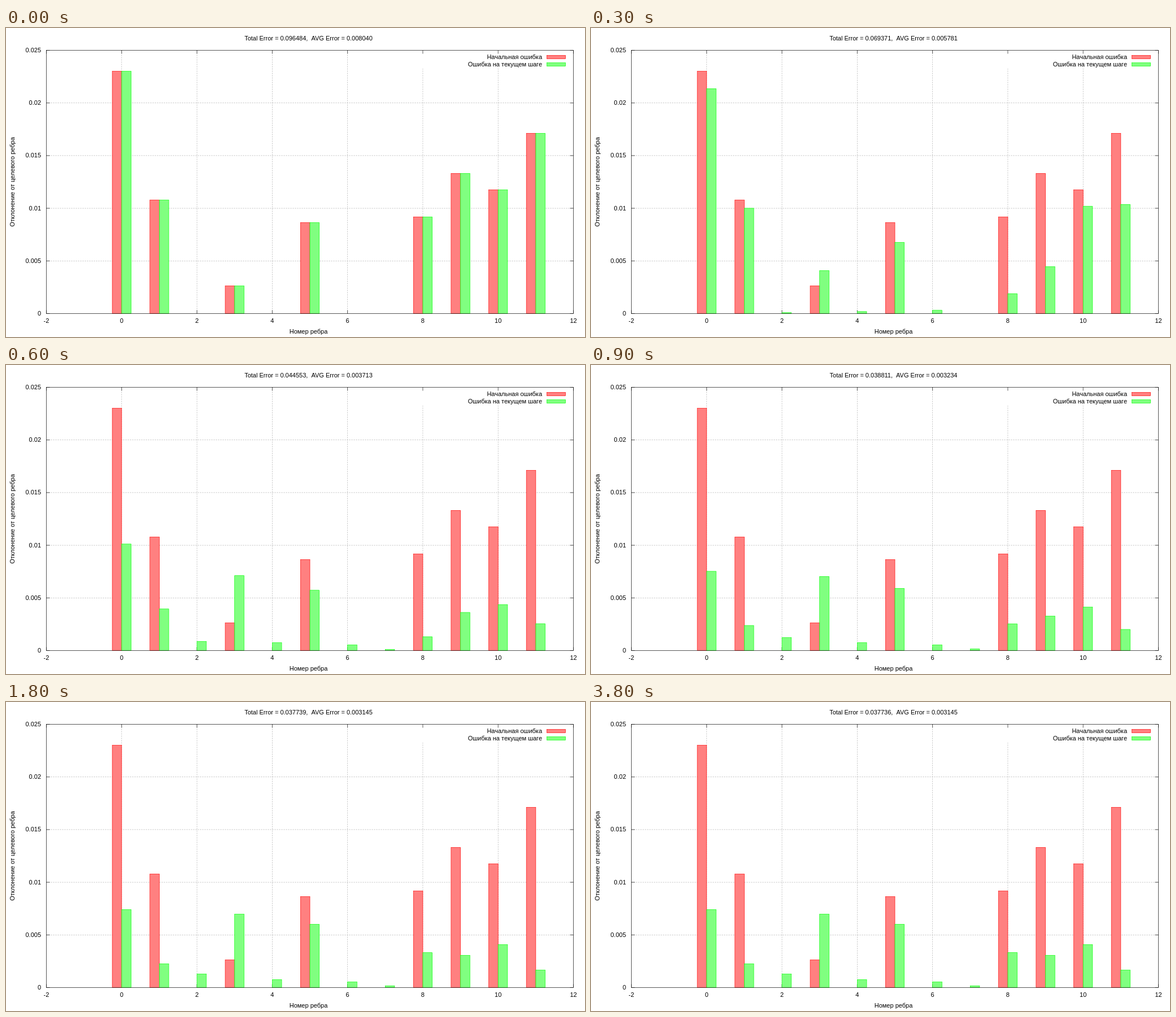
An HTML page with a canvas for the animation above (5 s loop, 1025 px wide and 547 px high).

```html
<!DOCTYPE html>
<html lang="ru">
<head>
<meta charset="utf-8">
<style>
  html, body { margin: 0; width: 100%; height: 100%; overflow: hidden; background: #fff; }
  canvas { display: block; }
</style>
</head>
<body>
<canvas id="chart" width="1025" height="547"></canvas>
<script>
const ctx = document.getElementById('chart').getContext('2d');
const LOOP = 5000;
const LEFT = 71.5, RIGHT = 1004.5, TOP = 39.5, BOTTOM = 505.5;
const RED = ['#ff8080', '#ff0000'], GREEN = ['#80ff80', '#00ff00'];

// Moments at which the optimiser shows its next step
const stepTimes = [0, 100, 300, 400, 500, 600, 800, 900, 1000, 1100, 1200,
                   1400, 1600, 1800, 3100, 3300, 3600, 3800];

// Each edge: first height, settled height, steps needed, swing on the way
const edges = [
  [429, 138, 4.15], [201, 42, 4.2, 3], [0, 24, 4.8], [49, 130, 2.8, 4],
  [0, 14, 3], [161, 112, 2, -7], [0, 10, 2.1], [0, 3, 5],
  [171, 62, 1.3, -50], [248, 57, 1.5, 14], [219, 76, 3.2, 3], [319, 31, 2.3, 22],
];

// Total error at a few steps
const totals = [[0, 0.096484], [2, 0.069371], [4, 0.047424], [7, 0.038811],
                [13, 0.037739], [14, 0.037706], [17, 0.037736]];

function currentHeight([first, settled, pace, swing = 0], step) {
  const bump = (step / 3.5 * Math.exp(1 - step / 3.5)) ** 4;
  return settled + (first - settled) * Math.exp(-((step / pace) ** 3)) + swing * bump;
}

function totalError(step) {
  const next = Math.max(1, totals.findIndex(([s]) => s >= step));
  const [s0, a] = totals[next - 1], [s1, b] = totals[next];
  return a + (b - a) * (step - s0) / (s1 - s0);
}

const xPixel = x => LEFT + (x + 2) / 14 * (RIGHT - LEFT);
const yPixel = y => BOTTOM - y / 0.025 * (BOTTOM - TOP);

function line(x1, y1, x2, y2, color = '#000', dash = []) {
  ctx.strokeStyle = color;
  ctx.setLineDash(dash);
  ctx.beginPath();
  ctx.moveTo(x1, y1);
  ctx.lineTo(x2, y2);
  ctx.stroke();
  ctx.setLineDash([]);
}

const gridLine = (...ends) => line(...ends, '#a0a0a0', [2, 2]);

function box(x, y, width, height, [fill, stroke]) {
  ctx.fillStyle = fill;
  ctx.strokeStyle = stroke;
  ctx.fillRect(x, y, width, height);
  ctx.strokeRect(x, y, width, height);
}

function text(str, x, y, align = 'center') {
  ctx.fillStyle = '#000';
  ctx.textAlign = align;
  ctx.fillText(str, x, y);
}

function bar(x, height, colors) {
  if (height < 0.2) return;
  box(xPixel(x), BOTTOM - height, xPixel(0.25) - xPixel(0), height, colors);
}

function drawAxes() {
  for (let x = -2; x <= 12; x += 2) {
    const px = xPixel(x);
    if (x > -2 && x < 12) gridLine(px, BOTTOM, px, x > 6 ? 72 : TOP);
    line(px, BOTTOM, px, BOTTOM - 6);
    line(px, TOP, px, TOP + 6);
    text(x, px, 522);
  }
  for (let i = 0; i <= 5; i++) {
    const py = yPixel(i * 0.005);
    if (i > 0 && i < 5) gridLine(LEFT, py, RIGHT, py);
    line(LEFT, py, LEFT + 6, py);
    line(RIGHT, py, RIGHT - 6, py);
    text(i * 5 / 1000, 62, Math.round(py + 3.5), 'right');
  }
  text('Номер ребра', 535.5, 541);
  ctx.save();
  ctx.translate(15, 272.5);
  ctx.rotate(-Math.PI / 2);
  text('Отклонение от целевого ребра', 0, 0);
  ctx.restore();
}

function drawLegend() {
  text('Начальная ошибка', 949, 55, 'right');
  box(957.5, 48.5, 33, 6, RED);
  text('Ошибка на текущем шаге', 949, 68, 'right');
  box(957.5, 61.5, 33, 6, GREEN);
}

function draw(time) {
  const step = stepTimes.findLastIndex(t => t <= time);
  const total = totalError(step);
  ctx.fillStyle = '#fff';
  ctx.fillRect(0, 0, 1025, 547);
  ctx.font = '11px "Liberation Sans", Arial, sans-serif';
  ctx.lineWidth = 0.65;
  drawAxes();
  drawLegend();
  text(`Total Error = ${total.toFixed(6)},\u00a0 AVG Error = ${(total / 12).toFixed(6)}`, 535.5, 22);
  edges.forEach(([first], x) => bar(x - 0.25, first, RED));
  edges.forEach((edge, x) => bar(x, currentHeight(edge, step), GREEN));
  ctx.strokeStyle = '#000';
  ctx.strokeRect(LEFT, TOP, RIGHT - LEFT, BOTTOM - TOP);
}

const start = performance.now();
function tick() {
  draw((performance.now() - start) % LOOP);
  requestAnimationFrame(tick);
}
tick();
</script>
</body>
</html>
```
